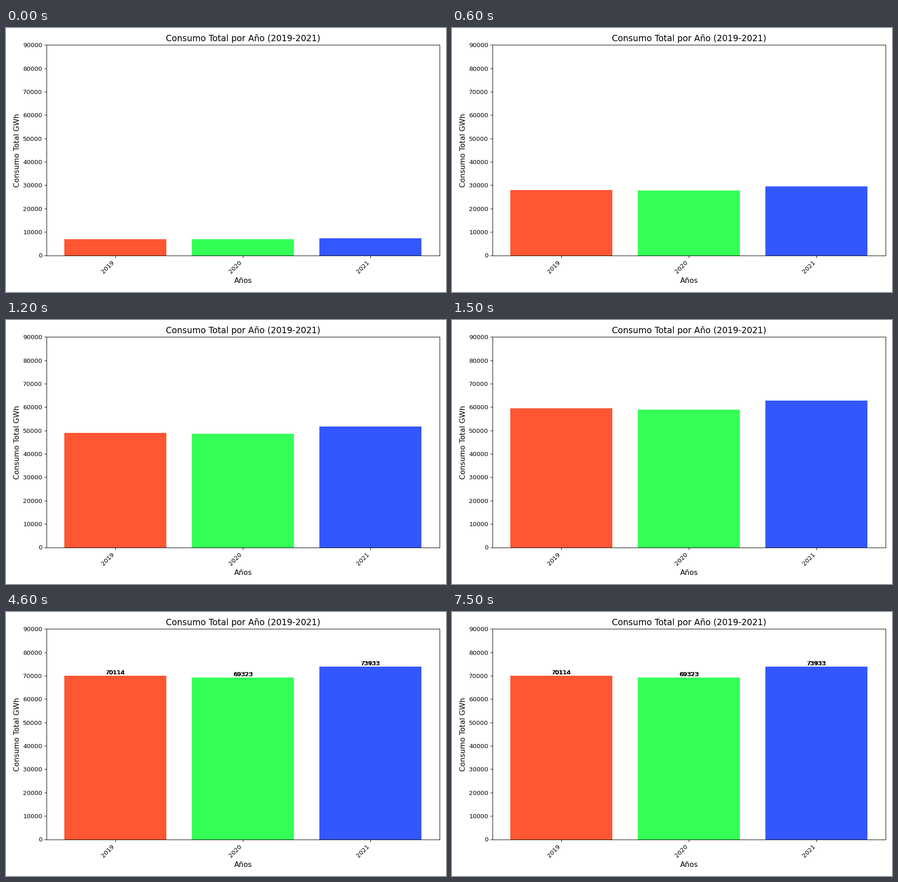
Animation of 966 by 580 pixels, one loop 8000 ms. Source, as a matplotlib script:

```python
import matplotlib.pyplot as plt
from matplotlib.animation import FuncAnimation

W, H, DPI = 966, 580, 96
FRAMES, INTERVAL = 80, 100
PT = W / (10 * DPI)  # scales point sizes to a ten-inch-wide layout

YEARS = ["2019", "2020", "2021"]
TOTALS = [70114, 69323, 73933]
COLORS = ["#FF5733", "#33FF57", "#3357FF"]
GROW_START, GROW_STEP = 0.10, 0.05
LABEL_START = 20

plt.rcParams.update({
    "font.family": "DejaVu Sans",
    "font.size": 10 * PT,
    "toolbar": "None",
})

fig, ax = plt.subplots(figsize=(W / DPI, H / DPI), dpi=DPI)
fig.subplots_adjust(left=89.2 / W, right=951.7 / W,
                    bottom=1 - 499.5 / H, top=1 - 37.4 / H)

bars = ax.bar(YEARS, TOTALS, color=COLORS)
ax.set_xlim(-0.54, 2.54)
ax.set_ylim(0, 90000)
ax.set_title("Consumo Total por Año (2019-2021)", fontsize=14 * PT)
ax.set_xlabel("Años", fontsize=12 * PT)
ax.set_ylabel("Consumo Total GWh", fontsize=12 * PT)
ax.tick_params(length=3.5 * PT)
plt.setp(ax.get_xticklabels(), rotation=45, ha="right")


def label_set():
    return [ax.text(x, total, str(total), ha="center", va="bottom",
                    color="black", visible=False)
            for x, total in enumerate(TOTALS)]


# The labels are laid over themselves once per frame, so their edges harden.
layers = [label_set() for _ in range(FRAMES - LABEL_START)]


def update(frame):
    share = min(1, GROW_START + GROW_STEP * frame)
    for bar, total in zip(bars, TOTALS):
        bar.set_height(total * share)
    for i, layer in enumerate(layers):
        for label in layer:
            label.set_visible(frame >= LABEL_START + i)
    return [*bars, *(label for layer in layers for label in layer)]


anim = FuncAnimation(fig, update, frames=FRAMES, interval=INTERVAL,
                     init_func=lambda: update(0), repeat=True,
                     repeat_delay=0, blit=False)
plt.show()
```
